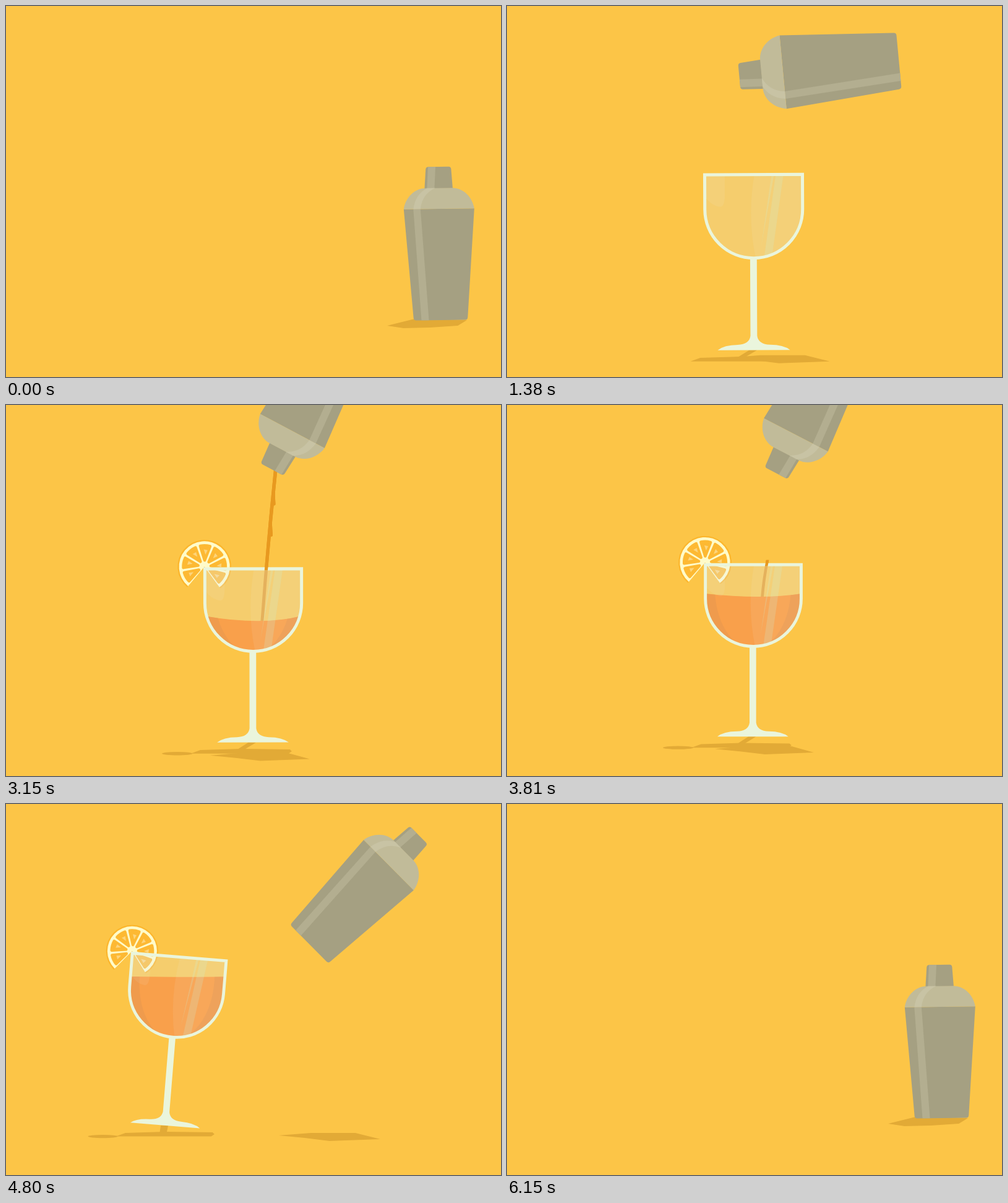
An HTML page with a canvas for the animation above (6.18 s loop, 800 by 600 pixels).

```html
<!DOCTYPE html>
<html lang="en">
<head>
<meta charset="utf-8">
<title>Cocktail</title>
<style>
html, body { margin: 0; height: 100%; overflow: hidden; background: #fcc547; }
canvas { display: block; width: 100vw; height: 100vh; }
</style>
</head>
<body>
<canvas width="800" height="600"></canvas>
<script>
const LOOP = 6180, RAD = Math.PI / 180;
const SHADOW = '#e2aa36', GLASS = '#eaf5dc', METAL = '#a5a082', STREAM = '#e8991f';
const ctx = document.querySelector('canvas').getContext('2d');

const ramp = (t, a, b) => Math.max(0, Math.min(1, (t - a) / (b - a)));
const inOut = r => (1 - Math.cos(Math.PI * r)) / 2;
const power = p => r => r ** p;
const out = p => r => 1 - (1 - r) ** p;
// An eased shift by a distance between two times
const move = (t, a, b, by, ease = inOut) => by * ease(ramp(t, a, b));
// A damped swing set off at one moment
const swing = (s, amp) => s > 0 ? amp * Math.exp(-s / 172) * Math.sin(Math.PI * s / 200) : 0;

const LAND = 2280;
const drift = t => move(t, 2040, 5160, 1, power(1.33));
const zoom = t => 1 + .045 * (move(t, 0, 810, 1) - drift(t));

// Hop, tip and pour, draw back, spin upright, land
const shakerPose = t => ({
  x: 700.5 + move(t, 0, 810, -43) + move(t, 810, 1400, -153.5) + move(t, 2040, 3150, -14)
    + move(t, 3700, 4380, 52) + move(t, 4450, 5420, 176, power(1.55)) + move(t, 5560, 6000, -17.5),
  y: 384 + move(t, 60, 600, -133) + move(t, 600, 810, 14.5) + move(t, 810, 1700, -229.5)
    + move(t, 2040, 3150, -45) + move(t, 3700, 4380, 101) + move(t, 4380, 5760, 292, power(1.55)),
  turn: -.7 + move(t, 0, 810, -8.6) + move(t, 810, 1810, -141) + move(t, 2040, 3150, -1.7)
    + move(t, 3700, 4380, -19.5, power(2)) + move(t, 4380, 5500, -189.2, out(3))
});

// Slide in, swing to a stop, take the slice, fill, slide out
const glassPose = t => ({
  x: -170 + move(t, 100, 700, 569, out(2)) + move(t, 3150, 4380, -3) + move(t, 4380, 5110, -550, power(2.5)),
  y: 520.5 + move(t, 0, 810, 36, out(2)) - 43 * drift(t) + swing(t - LAND, 6),
  tilt: -6 * Math.sin(Math.PI * ramp(t, 150, 700)) + swing(t - 710, 14) + swing(t - LAND, -8.5)
    + move(t, 4300, 5100, 9, power(1.4)),
  level: -139 + move(t, 1930, 4150, -101, power(.9)),
  dip: 16 * Math.sin(Math.PI * ramp(t, 2040, 4300))
});

function poly(color, ...p) {
  ctx.beginPath();
  for (let i = 0; i < p.length; i += 2) ctx.lineTo(p[i], p[i + 1]);
  ctx.closePath();
  ctx.fillStyle = color;
  ctx.fill();
}

function shape(color, d) {
  ctx.fillStyle = color;
  ctx.fill(new Path2D(d));
}

function group(x, y, deg, scale, draw) {
  ctx.save();
  ctx.translate(x, y);
  ctx.rotate(deg * RAD);
  ctx.scale(scale, scale);
  draw();
  ctx.restore();
}

function drawShaker() {
  shape(METAL, 'M-57-56H57L44.3 120Q44 124 40 124H-39Q-43 124-43.3 120Z');
  poly('#b3ae90', -41.5, -56, -30, -56, -18.5, 124, -30.5, 124);
  shape(METAL, 'M-23-89L-20.8-120Q-20.5-124-16.5-124H16Q20-124 20.3-120L22.5-89Z');
  poly('#b3ae90', -19, -89, -17, -124, -5, -124, -7, -89);
  shape('#c1bb99', 'M-57-56C-54-75-39-89.5-22-89.5H22C39-89.5 54-75 57-56Z');
  shape('#c8c3a4', 'M-41.5-56Q-38-80-19-89.5H-6Q-27-80-30-56Z');
}

// The shadow falls further left the higher the shaker is
function drawShakerShadow(t, pose) {
  const ground = 521 + move(t, 0, 810, 50) + move(t, 810, 2040, 15) + move(t, 2040, 5800, -65, power(1.5));
  const x = pose.x - 2 - .132 * (ground - pose.y);
  const tipped = Math.min(1, 2 * Math.abs(Math.sin(pose.turn * RAD)));
  const upright = [-64, -4, -20, -15, 65, -13, 49, -4, 5, -1, -38, 0];
  const pouring = [-82, -9, -30, -13, 42, -13, 82, -3, 0, 0, -40, -5];
  group(x, ground, 0, 1, () => poly(SHADOW, ...upright.map((v, i) => v + (pouring[i] - v) * tipped)));
}

function drawGlassShadow(tilt, landed) {
  const off = -18 + 3.9 * tilt;
  poly(SHADOW, -7, 0, 5, 0, off + 2, 13, off - 9, 13);
  poly(SHADOW, off - 79, 17.5, off - 64, 12, off, 10, off + 76, 11, off + 79, 14, off + 74, 17.5);
  if (landed > 0) {
    ctx.beginPath();
    ctx.ellipse(off - 120 + 20 * landed, 17.5, 24, 2.6, 0, 0, 7);
    ctx.fill();
  }
}

function sector(r, color) {
  ctx.beginPath();
  ctx.moveTo(0, 0);
  ctx.arc(0, 0, r, 130 * RAD, 414 * RAD);
  ctx.closePath();
  ctx.fillStyle = color;
  ctx.fill();
}

function drawSlice() {
  sector(42, '#fcb62c');
  sector(39.8, '#fffbc9');
  for (let i = 0; i < 7; i++) {
    ctx.save();
    ctx.rotate((130 + (i + .5) * 284 / 7) * RAD);
    ctx.beginPath();
    ctx.moveTo(10, 0);
    ctx.arc(0, 0, 33, -13.5 * RAD, 13.5 * RAD);
    ctx.closePath();
    ctx.fillStyle = ctx.strokeStyle = '#fdb933';
    ctx.lineWidth = 4.5;
    ctx.lineJoin = 'round';
    ctx.fill();
    ctx.stroke();
    poly('#fdd47a', 19, 1, 27, -2, 26, 4);
    ctx.restore();
  }
}

const bowl = new Path2D('M-74.9-271.6H76.3V-218A75.6 75.6 0 0 1-74.9-218Z');
const sheen = a => `rgba(220,233,244,${a})`;

function drawLiquid({ level, dip, tilt }) {
  const slope = 75 * Math.tan(tilt * RAD);
  ctx.save();
  ctx.beginPath();
  ctx.moveTo(-76, level + slope);
  ctx.quadraticCurveTo(15, level + dip, 77, level - slope);
  ctx.lineTo(77, -130);
  ctx.lineTo(-76, -130);
  ctx.clip();
  ctx.fillStyle = '#f9a04b';
  ctx.fillRect(-90, -300, 180, 180);
  // Darker rim of liquid along the bowl
  ctx.beginPath();
  ctx.rect(-90, -400, 180, 280);
  ctx.ellipse(0, -235, 60, 96, 0, 0, 7);
  ctx.fillStyle = 'rgba(222,148,80,.38)';
  ctx.fill('evenodd');
  ctx.restore();
}

function drawGlass(pose) {
  ctx.save();
  ctx.clip(bowl);
  ctx.fillStyle = sheen(.22);
  ctx.fillRect(-90, -280, 180, 160);
  if (pose.level < -139) drawLiquid(pose);
  shape(sheen(.08), 'M2-272Q-10-205 4-140H80V-272Z');
  shape(sheen(.08), 'M-76-272H-44V-240Q-44-222-51-222Q-66-224-76-240Z');
  poly('rgba(200,235,210,.22)', 35, -272, 47, -272, 28, -140, 16, -140);
  poly('rgba(200,235,210,.22)', 28.5, -272, 32.5, -272, 12, -160);
  ctx.restore();
  ctx.strokeStyle = GLASS;
  ctx.lineWidth = 4.8;
  ctx.lineJoin = 'miter';
  ctx.stroke(bowl);
  shape(GLASS, 'M-56 0Q-46-8-25-8.2Q-7-9-5.2-22V-142H5.2V-22Q7-9 25-8.2Q46-8 56 0Z');
}

function drawStream(t, from, to) {
  const top = ramp(t, 3700, 3860), end = ramp(t, 1890, 2020);
  if (end <= top) return;
  const width = 4 + 13.5 * (1 - ramp(t, 2040, 3300)), tip = 4 + width * .18;
  const at = u => [from.x + (to.x - from.x) * u, from.y + (to.y - from.y) * u, (width + (tip - width) * u) / 2];
  const [x0, y0, w0] = at(top), [x1, y1, w1] = at(end), [xm, ym, wm] = at((top + end) / 2);
  ctx.fillStyle = ctx.strokeStyle = STREAM;
  ctx.beginPath();
  ctx.moveTo(x0 - w0, y0);
  ctx.quadraticCurveTo(xm - wm - 2, ym, x1 - w1, y1);
  ctx.lineTo(x1 + w1, y1);
  ctx.quadraticCurveTo(xm + wm - 2, ym, x0 + w0, y0);
  ctx.fill();
  // Drips run down the right edge
  ctx.lineCap = 'round';
  ctx.lineWidth = 4;
  for (const phase of [.5, .91]) {
    const k = (t / 528.6 + phase) % 1 / 2;
    if (k < top + .08 || k > end) continue;
    const [ax, ay, aw] = at(k - .08), [bx, by, bw] = at(k);
    ctx.beginPath();
    ctx.moveTo(ax + aw - 3, ay);
    ctx.lineTo(bx + bw, by);
    ctx.stroke();
  }
}

function render(t) {
  const z = zoom(t), shaker = shakerPose(t), glass = glassPose(t), a = shaker.turn * RAD;
  ctx.fillStyle = '#fcc547';
  ctx.fillRect(0, 0, 800, 600);

  drawShakerShadow(t, shaker);
  group(glass.x, glass.y, 0, z, () => drawGlassShadow(glass.tilt, ramp(t, LAND - 150, LAND)));

  const mouth = {
    x: shaker.x + z * (-5 * Math.cos(a) + 121 * Math.sin(a)),
    y: shaker.y + z * (-5 * Math.sin(a) - 121 * Math.cos(a))
  };
  const pool = { x: glass.x + 15, y: glass.y + z * (Math.min(-147, glass.level) + 8) };
  drawStream(t, mouth, pool);

  const away = Math.max(0, (LAND - t) / 240);
  group(glass.x, glass.y, glass.tilt, z, () => {
    if (away < 2) group(-75.5 + 38 * away, -275 - 280 * away, 71 * away, 1, drawSlice);
    drawGlass(glass);
  });

  // The stream passes in front of the rim
  ctx.save();
  ctx.beginPath();
  ctx.rect(0, 0, 800, glass.y - 269 * z);
  ctx.clip();
  drawStream(t, mouth, pool);
  ctx.restore();

  group(shaker.x, shaker.y, shaker.turn, z, drawShaker);
}

function loop() {
  render(performance.now() % LOOP);
  requestAnimationFrame(loop);
}
loop();
</script>
</body>
</html>
```
